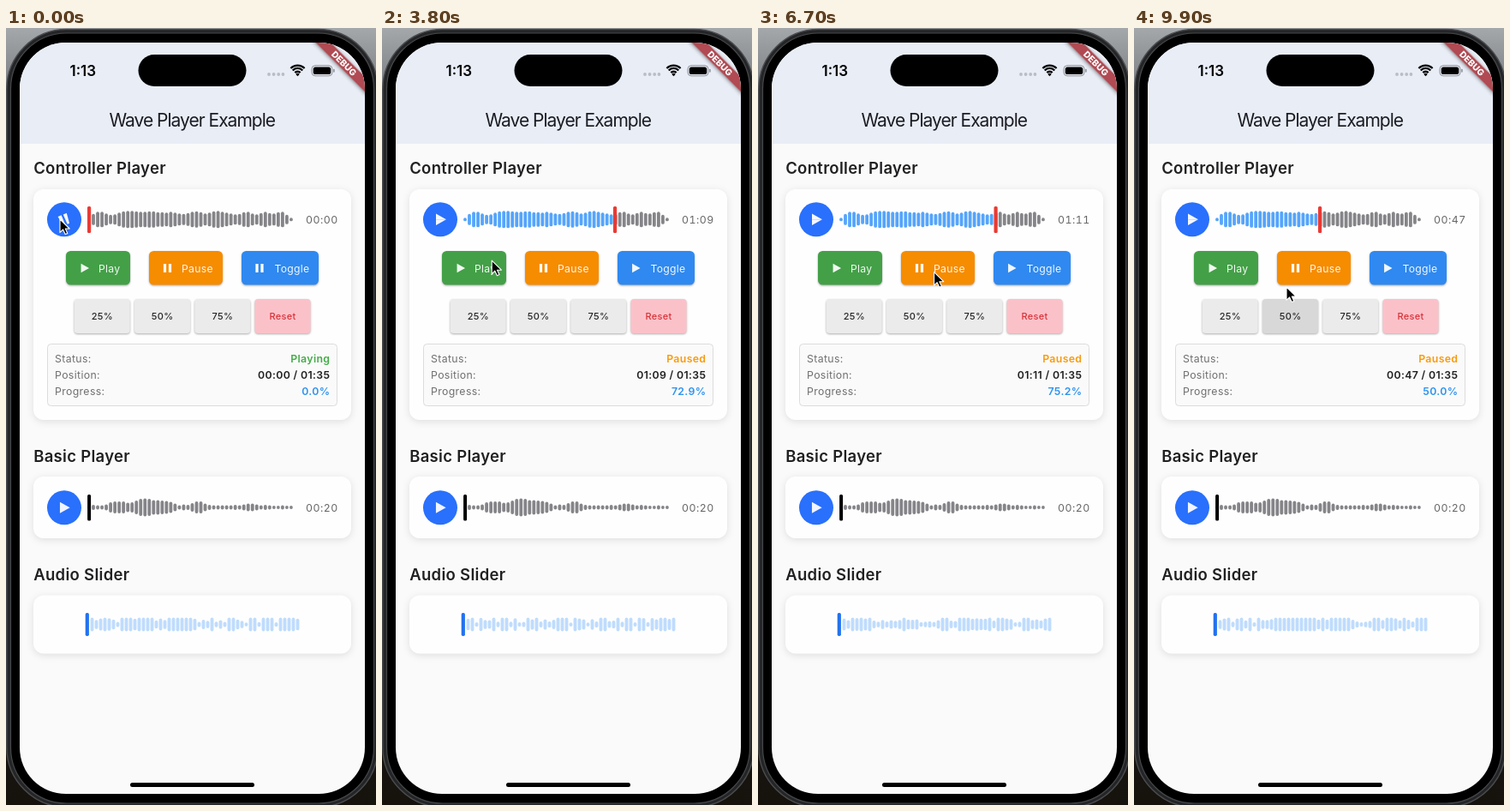
Animation of 432x906 px, one loop 10000 ms. Source, as an HTML page:

```html
<!DOCTYPE html>
<html lang="en">
<head>
<meta charset="utf-8">
<title>Wave Player Example</title>
<style>
  html, body { margin: 0; width: 100%; height: 100%; overflow: hidden; background: #15120e; }
  svg { display: block; width: 432px; height: 906px; }
  text { font-family: Inter, Roboto, sans-serif; font-size: 12.3px; letter-spacing: .35px; white-space: pre; }
  .title { font-size: 21px; letter-spacing: -1px; fill: #1b1c22; }
  .clock { font-size: 17px; font-weight: 600; letter-spacing: 0; }
  .head { font-size: 18.5px; font-weight: 600; letter-spacing: .3px; fill: #202022; }
  .time { font-size: 12.3px; letter-spacing: .5px; fill: #666; font-variant-numeric: tabular-nums; }
  .label { fill: #707070; }
  .value { font-weight: 600; }
  .action { font-size: 12.2px; letter-spacing: .3px; fill: #fff; fill-opacity: .92; }
  .small { font-size: 11px; font-weight: 500; letter-spacing: .3px; fill: #262626; }
  .debug { font-size: 10.3px; font-weight: 800; letter-spacing: 0; fill: #fff; }
  .card { filter: drop-shadow(0 2px 4px rgba(0, 0, 0, .11)); }
  .raised { filter: drop-shadow(0 1px 1.2px rgba(0, 0, 0, .32)); }
</style>
</head>
<body>
<svg id="stage" viewBox="0 0 432 906"></svg>
<script>
const LOOP = 10, STEP = 0.1, DURATION = 95.2, WAVE_X = 97, WAVE_W = 240;
const PLAY_SPANS = [[-0.2, 1.7], [4.05, 6.25]];

// [seconds, audio position]
const POSITION = [
  [0, 0], [1.7, 1.7], [2.3, 1.7], [2.9, 45.7], [3.4, 69.4], [4.05, 69.4],
  [6.25, 71.6], [8.3, 71.6], [8.3, 23.8], [9.3, 23.8], [9.3, 47.6], [10, 47.6]
];
// [seconds, x, y]
const POINTER = [
  [0, 63, 223], [1.8, 63, 223], [2.3, 70, 230], [2.9, 173, 232], [3.4, 233, 232],
  [3.9, 102, 281], [4.9, 102, 281], [5.5, 209, 281], [6.6, 209, 281], [7.3, 185, 307],
  [7.7, 185, 307], [8.1, 113, 336], [8.6, 113, 336], [9, 184, 336], [9.5, 184, 336], [9.8, 178, 302]
];
const CONTROLLER_WAVE = [
  4, 13, 18, 18, 14, 11, 12, 16, 19, 20, 20, 19, 18, 18, 19, 19, 17, 17, 16, 18, 16, 14, 13, 15,
  18, 19, 17, 14, 16, 19, 20, 18, 16, 14, 12, 13, 17, 18, 14, 12, 15, 18, 15, 14, 17, 18, 11, 4
];
const BASIC_WAVE = [
  4, 6, 5, 5, 7, 12, 14, 14, 14, 11, 12, 16, 20, 21, 20, 17, 17, 16, 15, 13, 9, 5, 7, 6,
  10, 14, 14, 9, 6, 5, 5, 5, 5, 5, 6, 5, 7, 9, 9, 7, 5, 6, 5, 4, 4, 5, 4, 4
];
const SLIDER_BARS = 49;

const clamp = v => Math.max(0, Math.min(1, v));
const lerp = (a, b, k) => a + (b - a) * k;

function sample(keys, t) {
  let i = 0;
  while (i < keys.length - 1 && keys[i + 1][0] <= t) i++;
  const from = keys[i], to = keys[i + 1] || from;
  const k = to === from ? 0 : (t - from[0]) / (to[0] - from[0]);
  return from.slice(1).map((v, n) => lerp(v, to[n + 1], k));
}

function noise(seed) {
  let s = (seed * 7919 + 12345) >>> 0;
  return () => {
    s = (s + 0x6D2B79F5) >>> 0;
    let r = Math.imul(s ^ (s >>> 15), 1 | s);
    r ^= r + Math.imul(r ^ (r >>> 7), 61 | r);
    return ((r ^ (r >>> 14)) >>> 0) / 4294967296;
  };
}

const rect = (x, y, w, h, r, fill, extra = '') =>
  `<rect x="${x}" y="${y}" width="${w}" height="${h}" rx="${r}" fill="${fill}" ${extra}/>`;
const text = (x, y, cls, str, extra = '') => `<text x="${x}" y="${y}" class="${cls}" ${extra}>${str}</text>`;
const card = (y, h) => rect(32, y, 371, h, 12, '#fefefe', 'class="card"');
const bar = (x, cy, h, fill) => rect((x - 1.9).toFixed(2), (cy - h / 2).toFixed(2), 3.8, h.toFixed(2), 1.9, fill);
const bars = (x, cy, pitch, heights, color) =>
  heights.map((h, i) => bar(x + i * pitch, cy, h, color(x + i * pitch))).join('');
const playIcon = (cx, cy, s) => `<path d="M${cx - s * .42} ${cy - s / 2}l${s * .9} ${s / 2}l${-s * .9} ${s / 2}z" fill="#fff" fill-opacity=".93"/>`;
const pauseIcon = (cx, cy) => rect(cx - 4.6, cy - 5, 3.2, 10, 0, '#fff') + rect(cx + 1.4, cy - 5, 3.2, 10, 0, '#fff');
const action = (x, w, fill, label, textX) =>
  rect(x, 260, w, 39.5, 5.5, fill, 'class="raised"') + text(textX, 284.5, 'action', label);
const small = (x, id, label, fill, color) =>
  rect(x, 316, 65, 40, 4, fill, `class="raised" id="${id}"`) +
  text(x + 32.6, 340, 'small', label, `text-anchor="middle" style="fill:${color}"`);
const row = (y, label, id) =>
  text(57, y, 'label', label) + text(378.4, y, 'value', '', `id="${id}" text-anchor="end"`);

const wifi = [[4.2, 2.4], [7.8, 2.3]].map(([r, w]) => {
  const d = r * .74;
  return `<path d="M${340.5 - d} ${55.2 - d}A${r} ${r} 0 0 1 ${340.5 + d} ${55.2 - d}" fill="none" stroke="#000" stroke-width="${w}"/>`;
}).join('') + '<path d="M340.5 56.2l-2.2-2.3a3.2 3.2 0 0 1 4.4 0z"/>' +
  '<path d="M332.4 47.1A11.4 11.4 0 0 1 348.6 47.1" fill="none" stroke="#000" stroke-width="2.2"/>';

const phone = `
  <defs>
    <linearGradient id="wall" x2="0" y2="1">
      <stop offset="0" stop-color="#a5a8aa"/><stop offset=".1" stop-color="#6f7278"/>
      <stop offset=".8" stop-color="#1c1a18"/><stop offset="1" stop-color="#16120c"/>
    </linearGradient>
    <clipPath id="screen">${rect(16, 17, 403, 876, 54, '#fff')}</clipPath>
  </defs>
  ${rect(0, 0, 432, 906, 0, 'url(#wall)')}
  ${rect(.8, 1.5, 433.4, 907, 70, '#242527', 'stroke="#4b4c4f" stroke-width="1.4"')}
  ${rect(5.5, 6, 424, 898, 65, '#000', 'stroke="#47484a" stroke-width="1.2"')}`;

const appBar = `
  ${rect(16, 17, 403, 876, 0, '#fafafa')}
  ${rect(16, 17, 403, 118, 0, '#e9edf6')}
  ${text(217.2, 115, 'title', 'Wave Player Example', 'text-anchor="middle"')}
  ${text(74.5, 56, 'clock', '1:13')}
  ${rect(154.5, 31, 126, 37, 18.5, '#000')}
  ${[307, 312.6, 318.2, 323.4].map(x => `<circle cx="${x}" cy="54" r="1.9" fill="#b9bdc6"/>`).join('')}
  ${wifi}
  ${rect(357, 43.8, 24, 12, 4, 'none', 'stroke="#8c8f96"')}
  ${rect(358.7, 45.5, 20.6, 8.6, 2.6, '#000')}
  ${rect(382.2, 47.8, 1.5, 4, .8, '#8c8f96')}
  <g transform="translate(394.7 41.3) rotate(45)">
    ${rect(-60, -6.2, 120, 12.4, 0, '#b14a52', 'style="filter:drop-shadow(0 1px 2px rgba(0,0,0,.45))"')}
    ${text(0, 3.8, 'debug', 'DEBUG', 'text-anchor="middle"')}
  </g>`;

const content = `
  ${text(32.2, 170, 'head', 'Controller Player')}
  ${card(188, 269)}
  <g id="halo"></g>
  <circle cx="68" cy="223.3" r="20" fill="#2970fc"/>
  <g id="morph" fill="#fff"></g>
  <g id="wave"></g>
  ${text(350, 228, 'time', '', 'id="elapsed"')}
  ${action(70, 75, '#43a047', 'Play', 108)}${playIcon(92, 280, 10.5)}
  ${action(167, 86, '#f68c00', 'Pause', 205)}${pauseIcon(188.5, 280)}
  ${action(275, 90, '#2f89f0', 'Toggle', 313.5)}
  <g id="togglePlay">${playIcon(296.5, 280, 10.5)}</g>
  <g id="togglePause">${pauseIcon(296, 280)}</g>
  ${small(79.7, 'quarter', '25%', '#ebebeb', '#262626')}
  ${small(150, 'half', '50%', '#ebebeb', '#262626')}
  ${small(220.3, 'most', '75%', '#ebebeb', '#262626')}
  ${small(290.5, 'reset', 'Reset', '#fbc1c9', '#d83238')}
  ${rect(48.5, 368.5, 338, 72, 4, '#fafafa', 'stroke="#dcdcdc"')}
  ${row(390, 'Status:', 'status')}
  ${row(409, 'Position:', 'position')}
  ${row(428, 'Progress:', 'progress')}

  ${text(32.2, 506, 'head', 'Basic Player')}
  ${card(523, 72)}
  <circle cx="68" cy="559.3" r="20" fill="#2970fc"/>
  ${playIcon(68.4, 559.3, 13)}
  ${bars(WAVE_X, 559, 5.02, BASIC_WAVE, () => '#858589')}
  ${rect(95.1, 544, 4, 30.5, 1.6, '#000')}
  ${text(350, 563.5, 'time', '00:20')}

  ${text(32.2, 644, 'head', 'Audio Slider')}
  ${card(661.5, 68)}
  <g id="slider"></g>
  ${rect(92.7, 682, 4.2, 27, 1.8, '#2272ee')}
  ${rect(145, 880, 145, 5, 2.5, '#000')}`;

const pointer = `<path id="pointer" d="M0 0V15.4L3.6 12L6.2 17.6L8.8 16.4L6.3 11H11.2Z" fill="#000" stroke="#fff" stroke-width="1.1" stroke-linejoin="round"/>`;

const $ = id => document.getElementById(id);
$('stage').innerHTML = `${phone}<g clip-path="url(#screen)">${appBar}${content}</g>${pointer}`;

const stamp = s => [s / 60, s % 60].map(v => String(Math.floor(v)).padStart(2, '0')).join(':');
const setText = (id, value) => { $(id).textContent = value; };
const show = (id, on) => $(id).setAttribute('visibility', on ? 'visible' : 'hidden');

// Two halves of a triangle turn into two upright bars.
function morphIcon(k) {
  const bars = [[-5.2, -6.2], [-1.6, -6.2], [-1.6, 6.2], [-5.2, 6.2]];
  const wedge = [[-6.7, -5], [0, -5], [0, 7], [0, 7]];
  const half = side => bars.map(([x, y], i) =>
    `${lerp(wedge[i][0], x, k) * side},${lerp(wedge[i][1], y, k)}`).join(' ');
  $('morph').setAttribute('transform', `translate(68 223.3) rotate(${-90 * (1 - k)})`);
  $('morph').innerHTML = [1, -1].map(s => `<polygon points="${half(s)}" fill-opacity=".95"/>`).join('');
}

function drawHalo(t, span) {
  if (!span) return '';
  const phase = (t - Math.max(0, span[0])) / 1.5 % 2;
  const grow = (phase < 1 ? phase : 2 - phase) * 8.2;
  return [[1, .2], [.5, .25]].map(([k, alpha]) =>
    `<circle cx="68" cy="223.3" r="${19.5 + grow * k}" fill="#2196f3" opacity="${alpha}"/>`).join('');
}

function sliderHeights(seed) {
  const random = noise(seed);
  return Array.from({ length: SLIDER_BARS }, () => Math.min(16, 4.5 + random() * 20));
}

function pressShade(t, from, to) {
  const k = Math.min(clamp((t - from) / .2), clamp((to - t) / .3));
  const v = Math.round(lerp(235, 216, k));
  return `rgb(${v},${v},${v})`;
}

function render(t) {
  const [pos] = sample(POSITION, t);
  const [px, py] = sample(POINTER, t);
  const ratio = pos / DURATION, headX = WAVE_X + WAVE_W * ratio;
  const span = PLAY_SPANS.find(([a, b]) => t >= a && t < b);

  $('halo').innerHTML = drawHalo(t, span);
  const ended = PLAY_SPANS.filter(s => s[1] <= t).pop();
  morphIcon(span ? clamp((t - span[0]) / .27) : 1 - clamp((t - ended[1]) / .27));

  $('wave').innerHTML =
    bars(WAVE_X, 223.3, 5.02, CONTROLLER_WAVE, x => x < headX ? '#55a5fb' : '#858589') +
    rect(headX - 2, 208, 4.2, 31, 1.6, '#ea3a34');
  $('slider').innerHTML = bars(100.5, 695.5, 5, sliderHeights(Math.floor(pos * 5 + .001)), () => '#bfdcfd');

  setText('elapsed', stamp(pos + .001));
  setText('position', `${stamp(pos + .001)} / ${stamp(DURATION)}`);
  setText('progress', `${(ratio * 100).toFixed(1)}%`);
  setText('status', span ? 'Playing' : 'Paused');
  $('status').style.fill = span ? '#43ac48' : '#f99a0c';
  $('progress').style.fill = '#2e93f0';
  $('position').style.fill = '#202020';
  show('togglePlay', !span);
  show('togglePause', span);

  $('quarter').setAttribute('fill', pressShade(t, 8, 8.9));
  $('half').setAttribute('fill', pressShade(t, 8.9, 10.2));
  $('pointer').setAttribute('transform', `translate(${px} ${py})`);
}

const start = performance.now();
function tick() {
  const seconds = (performance.now() - start) / 1000 % LOOP;
  render(Math.floor(seconds / STEP + .001) * STEP);
  requestAnimationFrame(tick);
}
tick();
</script>
</body>
</html>
```
